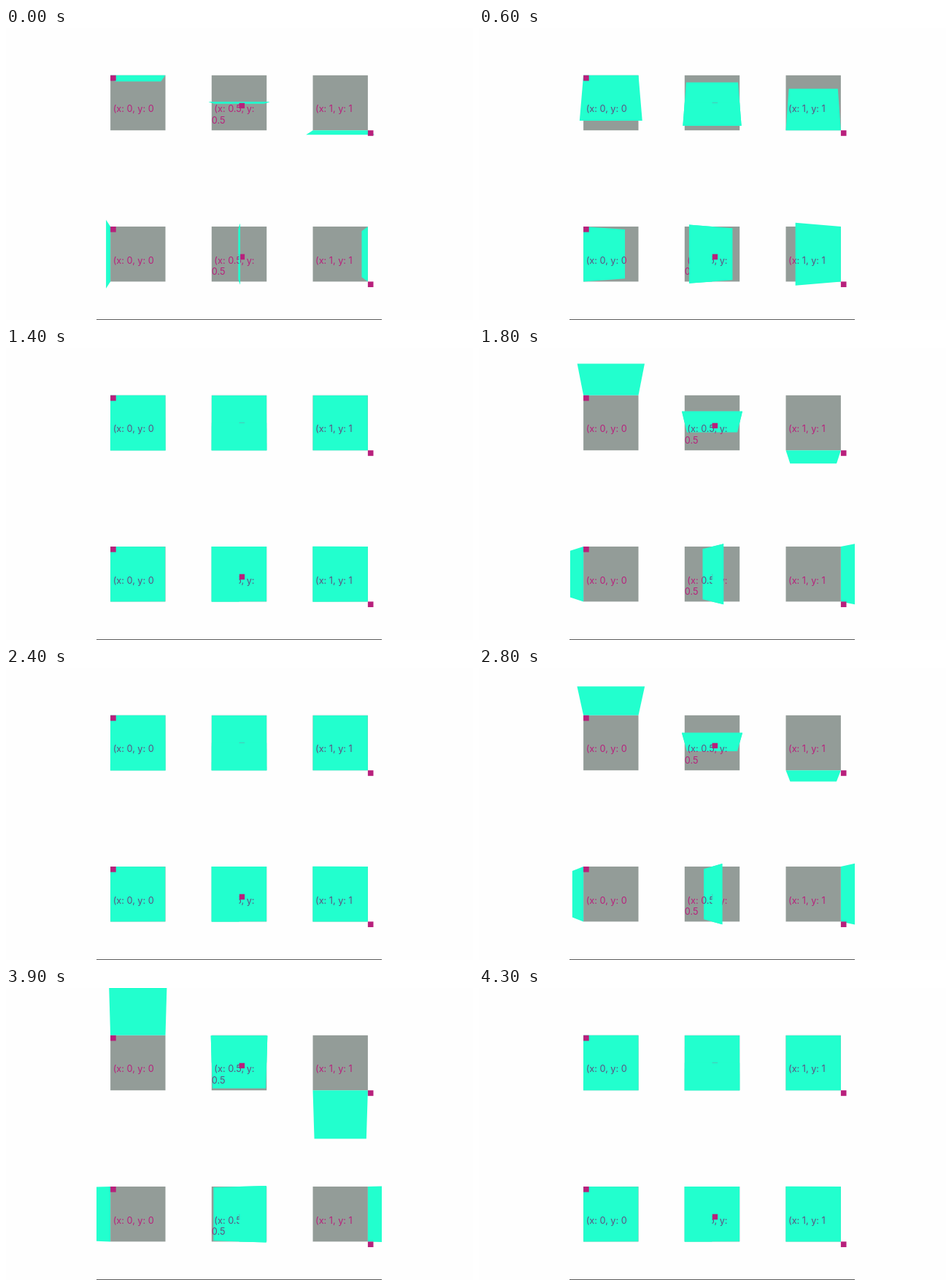
These frames come from a looping animation (640 by 400 pixels, 4.4 s). An HTML page with a canvas:

```html
<!DOCTYPE html>
<html lang="en">
<head>
<meta charset="utf-8">
<title>Rotation anchors</title>
<style>
  html, body { margin: 0; width: 100%; height: 100%; overflow: hidden; background: #fefefe; }
  canvas { display: block; width: 640px; height: 400px; }
</style>
</head>
<body>
<canvas id="stage" width="640" height="400"></canvas>
<script>
const ctx = document.getElementById('stage').getContext('2d');
const LOOP = 4400, STEP = 100;
const SIZE = 75.4, HALF = SIZE / 2, DOT = 7.6, DEPTH = SIZE * 5.05;
const GREY = '#939c98', CYAN = '#22ffce', PINK = '#b8207c', TEXT_ON_CYAN = '#5f4f80';

// Each turn takes a little over a second; the loop is cut inside the last one.
const TURN = 1010;
const turnStarts = [-721, 310, 1331, 2336, 3345, 4245];

const columns = [
  { x: 143.1, anchor: 0, lines: [' (x: 0, y: 0'] },
  { x: 281.8, anchor: 0.5, lines: [' (x: 0.5, y:', '0.5'] },
  { x: 420.5, anchor: 1, lines: [' (x: 1, y: 1'] }
];
const rows = [
  { y: 64.8, vertical: true },
  { y: 272, vertical: false }
];

const bezier = (a, b, s) =>
  3 * a * s * (1 - s) ** 2 + 3 * b * s * s * (1 - s) + s ** 3;

function ease(x) {
  let low = 0, high = 1;
  for (let i = 0; i < 30; i++) {
    const mid = (low + high) / 2;
    if (bezier(0.56, 0.64, mid) < x) low = mid; else high = mid;
  }
  return bezier(0, 1, low);
}

function angleAt(time) {
  const start = turnStarts.filter(s => s <= time).pop();
  return -2 * Math.PI * ease(Math.min(1, (time - start) / TURN));
}

// Outline of the turned card between two positions along its turning side.
function cardPath(col, row, angle, from, to) {
  const hinge = (col.anchor - 0.5) * SIZE;
  const tilt = row.vertical ? Math.sin(angle) : -Math.sin(angle);
  const cx = col.x + HALF, cy = row.y + HALF;
  const project = (along, across) => {
    const d = along - hinge;
    const scale = DEPTH / (DEPTH + d * tilt);
    const u = (hinge + d * Math.cos(angle)) * scale, v = across * scale;
    return row.vertical ? [cx + v, cy + u] : [cx + u, cy + v];
  };
  const path = new Path2D();
  for (const [along, across] of [[from, -HALF], [from, HALF], [to, HALF], [to, -HALF]])
    path.lineTo(...project(along, across));
  path.closePath();
  return path;
}

function fill(path, color) {
  ctx.fillStyle = color;
  ctx.fill(path);
}

function drawText(col, row, color, clip, rule) {
  ctx.save();
  ctx.clip(clip, rule);
  ctx.fillStyle = color;
  col.lines.forEach((line, i) => ctx.fillText(line, col.x, row.y + 50.5 + i * 15.8));
  ctx.restore();
}

function drawCell(col, row, angle) {
  ctx.fillStyle = GREY;
  ctx.fillRect(col.x, row.y, SIZE, SIZE);

  const card = cardPath(col, row, angle, -HALF, HALF);
  fill(card, CYAN);

  const outside = new Path2D(card);
  outside.rect(-200, -200, 1040, 800);
  drawText(col, row, PINK, outside, 'evenodd');
  drawText(col, row, TEXT_ON_CYAN, card, 'nonzero');

  ctx.fillStyle = PINK;
  ctx.fillRect(col.x + col.anchor * SIZE, row.y + col.anchor * SIZE, DOT, DOT);

  // The centred card cuts through the label: its nearer half covers it.
  if (col.anchor === 0.5) {
    const firstHalfNear = (Math.sin(angle) > 0) === row.vertical;
    fill(firstHalfNear ? cardPath(col, row, angle, -HALF, 0)
                       : cardPath(col, row, angle, 0, HALF), CYAN);
  }
}

function draw(time) {
  const angle = angleAt(time);
  ctx.fillStyle = '#fefefe';
  ctx.fillRect(0, 0, 640, 400);
  ctx.save();
  ctx.beginPath();
  ctx.rect(124, 0, 391, 400);
  ctx.clip();
  ctx.font = '12.7px Inter, "Liberation Sans", sans-serif';
  for (const row of rows)
    for (const col of columns) drawCell(col, row, angle);
  ctx.fillStyle = '#5c5c5c';
  ctx.fillRect(124, 399, 391, 1);
  ctx.restore();
}

const origin = performance.now();
function frame() {
  const time = (performance.now() - origin) % LOOP;
  draw(Math.floor(time / STEP) * STEP);
  requestAnimationFrame(frame);
}
frame();
</script>
</body>
</html>
```
